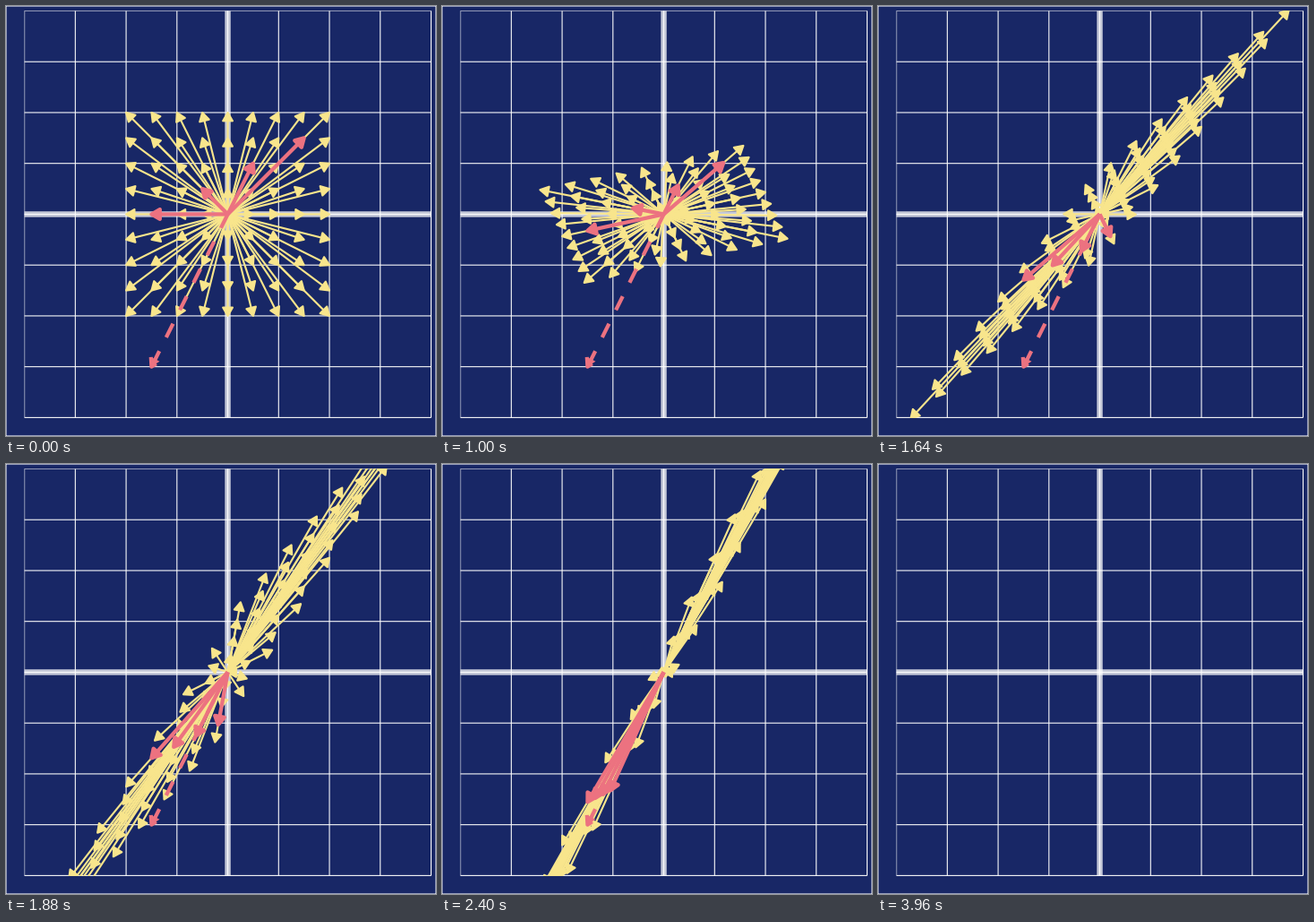
A matplotlib script that plays this animation: 480 px wide and 480 px high, repeating every 4000 ms.

```python
import numpy as np
import matplotlib.pyplot as plt
from matplotlib.animation import FuncAnimation
from matplotlib.collections import LineCollection, PolyCollection
from matplotlib.patches import Rectangle

SIZE, DPI, FRAMES, INTERVAL = 480, 100, 100, 40
PT = 72 / DPI                       # points per pixel
CENTER = np.array([247.56, 232.44])
UNIT = 56.74                        # pixels per grid cell
HEAD = 10.8                         # side of an arrow head
THIN, MEDIUM, THICK, BAND = 1.07, 2.13, 4.27, 6.4
NAVY, YELLOW, PINK = "#182766", "#f8e58c", "#ec7280"

END = np.array([[1, -2], [2, -4]])
side = np.linspace(-2, 2, 9)
field = np.array([(x, y) for x in side for y in side])
solutions = np.array([(1.5, 1.5), (0.5, 1), (-0.5, 0.5), (-1.5, 0)])
target = np.array([(-1.5, -3)])

# progress of the map from the identity to END, by frame
KEY_FRAMES = [0, 20, 33, 34, 41, 54, 64, 65, 67]
KEY_VALUES = [0, 0.0026, 0.278, 0.278, 0.43, 0.718, 0.939, 0.939, 1]


def to_px(v):
    return CENTER + np.asarray(v) * [UNIT, -UNIT]


def shafts(vecs):
    return [(CENTER, tip) for tip in to_px(vecs)]


def heads(vecs):
    back = np.arctan2(-vecs[:, 1], -vecs[:, 0])
    back = np.where(np.hypot(*vecs.T) < 1e-9, 0, back)
    tips = to_px(vecs)

    def corner(turn):
        a = back + np.radians(turn)
        return tips + HEAD * np.column_stack([np.cos(a), -np.sin(a)])

    return np.stack([corner(30), tips, corner(-30)], axis=1)


fig = plt.figure(figsize=(SIZE / DPI, SIZE / DPI), dpi=DPI, facecolor=NAVY)
ax = fig.add_axes([0, 0, 1, 1])
ax.set_xlim(0, SIZE)
ax.set_ylim(SIZE, 0)
ax.axis("off")

left, top = CENTER - 4 * UNIT
right, bottom = CENTER + 4 * UNIT


def clip(part):
    # one pixel of slack at the right and bottom; a polygon keeps soft edges
    xs, ys = (left, right + 1), (top, bottom + 1)
    part.set_clip_path(Rectangle((xs[0], ys[0]), xs[1] - xs[0], ys[1] - ys[0],
                                 transform=ax.transData))


def rules(k, width, alpha=1.0):
    """Vertical and horizontal line at grid position k, as filled strips."""
    x, y = CENTER + k * UNIT
    for cx, cy, w, h in ((x, (top + bottom) / 2, width, bottom - top),
                         ((left + right) / 2, y, right - left, width)):
        x0, x1 = max(cx - w / 2, left), cx + w / 2
        y0, y1 = max(cy - h / 2, top), cy + h / 2
        ax.add_patch(Rectangle((x0, y0), x1 - x0, y1 - y0, fc="white",
                               lw=0, alpha=alpha, snap=False))


ax.add_patch(Rectangle((0, 0), SIZE, SIZE, fill=False, ec="white",
                       lw=THIN * PT, snap=False))
for k in range(-4, 5):
    rules(k, THIN)
rules(0, BAND, alpha=0.75)


def arrows(vecs, color, width, z, style="solid"):
    opts = dict(linewidths=width * PT, linestyles=style, zorder=z)
    lines = LineCollection(shafts(vecs), colors=color, **opts)
    tips = PolyCollection(heads(vecs), facecolors=color, edgecolors=color,
                          joinstyle="round", **opts)
    for part in (lines, tips):
        part.set_snap(False)
        ax.add_collection(part, autolim=False)
        clip(part)
    return lines, tips


moving = [(field, arrows(field, YELLOW, MEDIUM, 4)),
          (solutions, arrows(solutions, PINK, THICK, 6))]
fixed = arrows(target, PINK, THICK, 5, (0, (4, 4)))


def update(n):
    t = np.interp(n, KEY_FRAMES, KEY_VALUES)
    matrix = (1 - t) * np.eye(2) + t * END
    visible = n < FRAMES - 1
    for vecs, (lines, tips) in moving:
        moved = vecs @ matrix.T
        lines.set_segments(shafts(moved))
        tips.set_verts(heads(moved))
        lines.set_visible(visible)
        tips.set_visible(visible)
    for part in fixed:
        part.set_visible(visible)
    return []


anim = FuncAnimation(fig, update, frames=FRAMES, interval=INTERVAL,
                     repeat=True, repeat_delay=0, blit=False)
plt.show()
```
